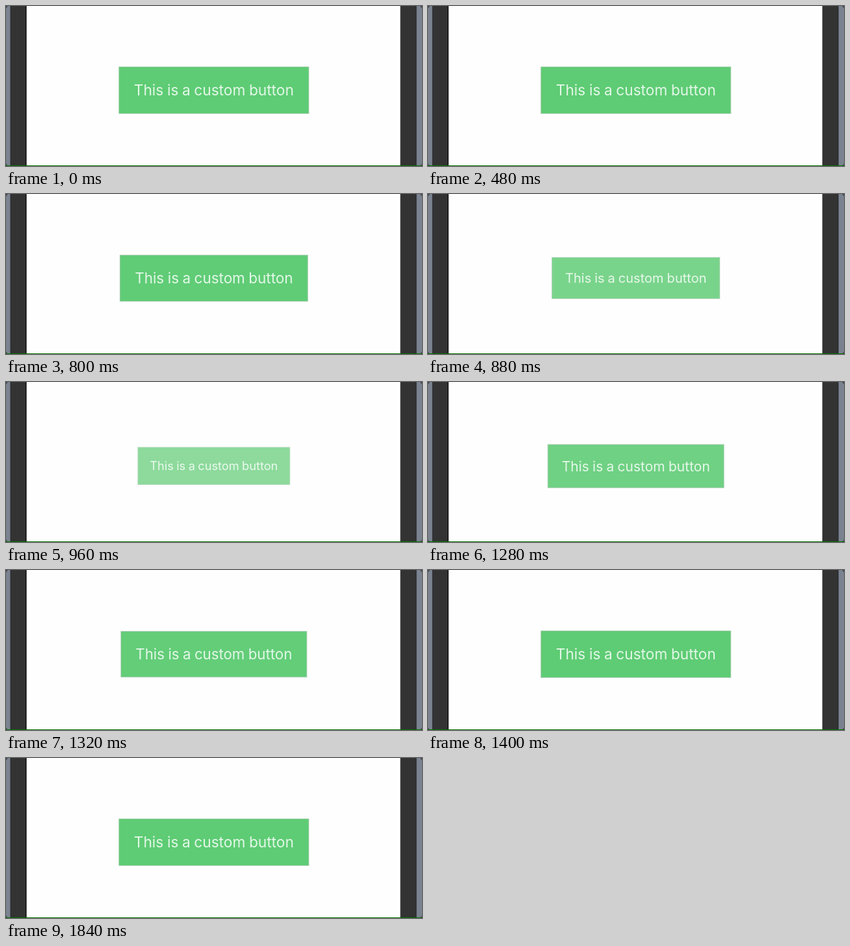
An HTML page that plays this animation: 640 px wide and 247 px high, repeating every 2.28 s.

```html
<!DOCTYPE html>
<html lang="en">
<head>
<meta charset="utf-8">
<title>Custom button</title>
<style>
  html, body { margin: 0; width: 100%; height: 100%; overflow: hidden; background: #fff; }
  svg { display: block; }
  text { font: 400 22.7px Inter, Roboto, sans-serif; word-spacing: -.8px; fill: #e3f7e8; text-anchor: middle; }
</style>
</head>
<body>
<svg width="640" height="247" viewBox="0 0 640 247">
  <rect width="640" height="247" fill="#fefefe"/>
  <!-- device sides -->
  <rect width="30" height="247" fill="#333"/>
  <rect width="6" height="247" fill="#7b8390"/>
  <rect x="6" width="1" height="247" fill="#585e67"/>
  <rect x="7" width="1" height="247" fill="#292a2d"/>
  <rect x="30" width="1" height="247" fill="#0c0c0c"/>
  <rect x="31" width="1" height="247" fill="#666"/>
  <rect x="607" width="33" height="247" fill="#333"/>
  <rect x="606" width="1" height="247" fill="#aaa"/>
  <rect x="630" width="1" height="247" fill="#292a2d"/>
  <rect x="631" width="1" height="247" fill="#484d55"/>
  <rect x="632" width="8" height="247" fill="#7b8390"/>
  <path d="M0 0h3L0 4zM640 0h-3l3 4zM0 247h3l-3-4zM640 247h-3l3-4z" fill="#444a52"/>
  <rect y="246" width="640" height="1" fill="#007500"/>
  <g id="button">
    <rect x="-146" y="-36" width="292" height="72" fill="#5ecc74" stroke="#9dbfa5" stroke-opacity=".6" stroke-width="1.2"/>
    <text y="8.4">This is a custom button</text>
  </g>
</svg>
<script>
const LOOP = 2280, FADE = 200, PRESS = 770, RELEASE = 1162;
const button = document.getElementById('button');

const clamp = v => Math.min(1, Math.max(0, v));
// close to the standard ease-in-out curve
const ease = p => (1 - Math.cos(Math.PI * p)) / 2;
const progress = (t, start) => ease(clamp((t - start) / FADE));

function draw(now) {
  const t = now % LOOP;
  const pressed = progress(t, PRESS) - progress(t, RELEASE);
  button.setAttribute('transform', `translate(319.8 ${130 - 0.4 * pressed}) scale(${1 - 0.2 * pressed})`);
  button.setAttribute('opacity', 1 - 0.3 * pressed);
}

let start;
function tick(now) {
  start ??= now;
  draw(now - start);
  requestAnimationFrame(tick);
}
draw(0);
requestAnimationFrame(tick);
</script>
</body>
</html>
```
